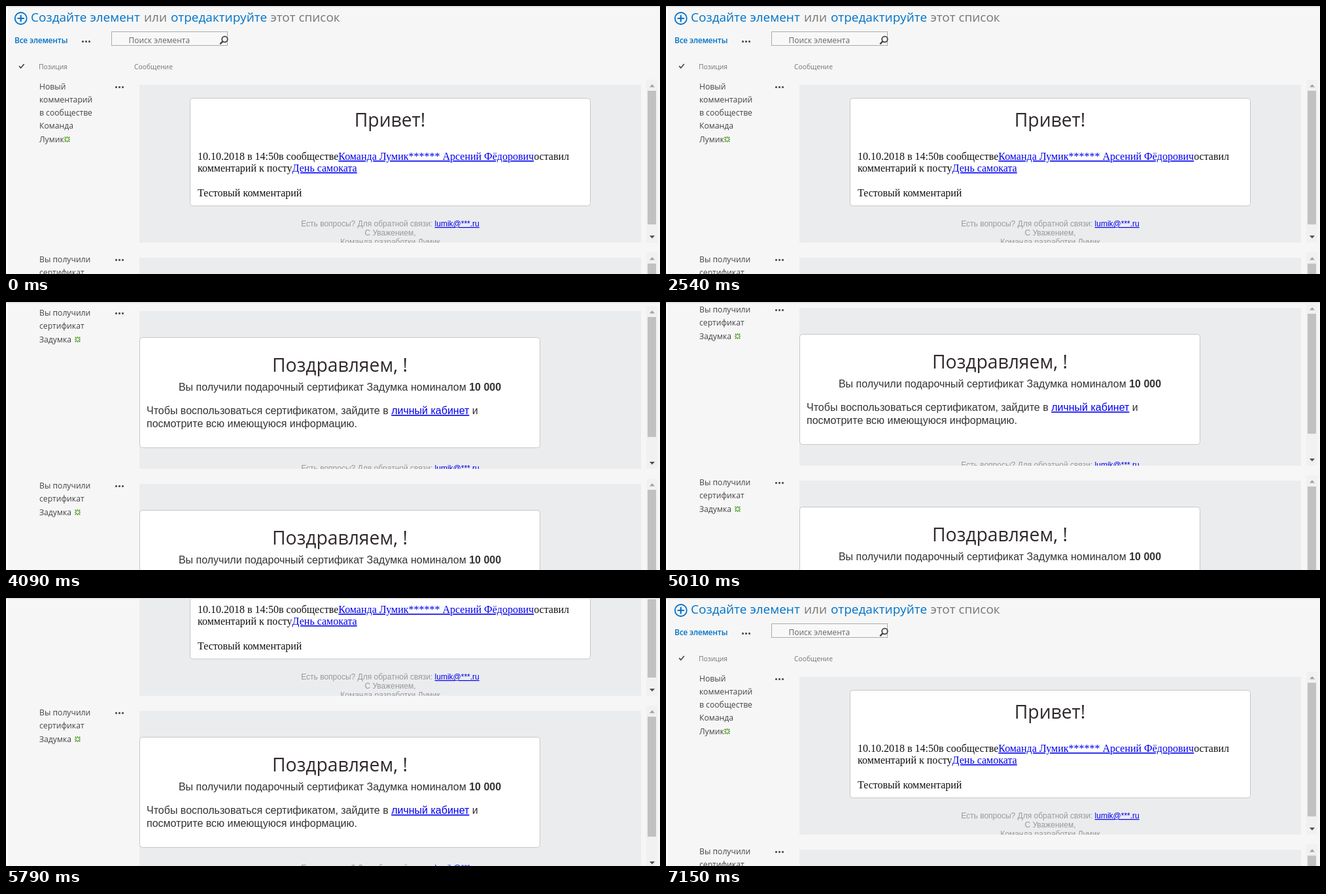
Write an HTML page that moves like this. It is 1000 by 411 pixels and loops after 7300 ms.

```html
<!DOCTYPE html>
<html lang="ru">
<head>
<meta charset="utf-8">
<title>Список сообщений</title>
<style>
  html, body { margin: 0; width: 100%; height: 100%; overflow: hidden; background: #f6f6f6; }
  svg { display: block; width: 100vw; height: 100vh; }
  .ui { font-family: "Open Sans", "Noto Sans", sans-serif; }
  .sans { font-family: "Liberation Sans", Arial, sans-serif; }
  .serif { font-family: "Liberation Serif", "Times New Roman", serif; }
  .link { fill: #0000ee; text-decoration: underline; }
  .mid { text-anchor: middle; }
</style>
</head>
<body>
<svg id="stage" viewBox="0 0 1000 411" preserveAspectRatio="none"></svg>
<script>
const LOOP = 7300;
const ROW_H = 265;
const BLUE = '#0072c6';

// Each track holds its value until the next time: [ms, value, ...]
const pageTrack = [
  [0, 0], [3310, 28], [3480, 100], [3640, 179], [3790, 238], [3940, 300], [4090, 372], [4240, 400],
  [5010, 377], [5170, 340], [5320, 305], [5470, 275], [5630, 243], [5790, 213], [5910, 70], [6060, 0]
];
const innerTrack = [[0, 0], [1190, 4], [1340, 9], [1490, 14], [1790, 5], [1940, 0]];
const thumbTrack = [[0, '#c1c1c1'], [740, '#a8a8a8'], [1040, '#787878'], [2240, '#a8a8a8'], [2540, '#c1c1c1']];
const cursorTrack = [
  [0], [290, 962, 396], [440, 974, 350], [590, 982, 312], [740, 984, 289],
  [1190, 984, 292], [1340, 984, 296], [1490, 984, 300], [1790, 986, 293], [1940, 987, 289],
  [2540], [6670, 984, 322], [6820, 976, 356], [7000, 962, 392], [7150]
];

const at = (track, t) => track.findLast(k => k[0] <= t);

const rect = (x, y, w, h, fill, more = '') =>
  `<rect x="${x}" y="${y}" width="${w}" height="${h}" fill="${fill}" ${more}/>`;
const text = (x, y, size, fill, str, cls = 'ui', more = '') =>
  `<text x="${x}" y="${y}" font-size="${size}" fill="${fill}" class="${cls}" ${more}>${str}</text>`;
const link = str => `<tspan class="link">${str}</tspan>`;
const dots = (x, y) => [0, 5, 10].map(d => rect(x + d, y, 3, 3, '#555', 'rx="1"')).join('');
const check = (x, y) =>
  `<path d="M${x} ${y}l2.7 3 5-6" fill="none" stroke="#444" stroke-width="1.7"/>`;
const card = (x, y, h) =>
  rect(x + .5, y + .5, 612, h, '#fff', 'rx="4" stroke="#c6c7c9"');

function sparkle(x, y) {
  let d = '';
  for (let i = 0; i < 8; i++) {
    const a = i * Math.PI / 4, r = i % 2 ? 5.4 : 4.4;
    const c = Math.cos(a), s = Math.sin(a);
    d += `M${x + c * 2} ${y + s * 2}L${x + c * r} ${y + s * r}`;
  }
  return `<path d="${d}" stroke="#4a9a1c" stroke-width="1.5"/>`;
}

function footer(y) {
  const line = (i, str) => text(587.5, y + i * 14, 12, '#999', str, 'sans mid');
  return line(0, `Есть вопросы? Для обратной связи: ${link('lumik@***.ru')}`) +
    line(1, 'С Уважением,') + line(2, 'Команда разработки Лумик');
}

function commentMail() {
  const line = (y, str) => text(293, y, 16, '#111', str, 'serif');
  return card(281, 141, 165) +
    text(587, 185, 28.3, '#30292b', 'Привет!', 'ui mid') +
    line(236, `10.10.2018 в 14:50в сообществе${link('Команда Лумик****** Арсений Фёдорович')}оставил`) +
    line(254, `комментарий к посту${link('День самоката')}`) +
    line(292, 'Тестовый комментарий') +
    footer(338);
}

function giftMail() {
  const line = (y, str, x = 215, cls = 'sans') => text(x, y, 16, '#333', str, cls);
  return card(204, 161, 169) +
    text(510.5, 214, 28.3, '#30292b', 'Поздравляем, !', 'ui mid') +
    line(243, 'Вы получили подарочный сертификат Задумка номиналом <tspan font-weight="700">10 000</tspan>', 510.5, 'sans mid') +
    line(279, `Чтобы воспользоваться сертификатом, зайдите в ${link('личный кабинет')} и`) +
    line(299, 'посмотрите всю имеющуюся информацию.') +
    footer(366);
}

const commentRow = {
  title: ['Новый', 'комментарий', 'в сообществе', 'Команда', 'Лумик'],
  star: 93.5, mail: commentMail, panel: 248, thumb: 205
};
const giftRow = {
  title: ['Вы получили', 'сертификат', 'Задумка'],
  star: 109.5, mail: giftMail, panel: 277, thumb: 184
};

function row(r, i) {
  const last = r.title.length - 1;
  const title = r.title.map((s, n) =>
    text(51, 128 + n * 20 + (n === last ? 1 : 0), 12.2, '#444', s)).join('');
  return `<g transform="translate(0 ${i * ROW_H})">
    <g id="hover${i}" visibility="hidden">
      ${rect(13, 108, 987, 265, '#e0eef9')}${rect(157, 108, 34, 265, '#cce4f7')}${check(20.5, 240)}
    </g>
    ${title}${sparkle(r.star, 124.5 + last * 20)}${dots(167, 123)}
    <g clip-path="url(#view)"><g id="mail${i}">${rect(204, 121, 767, r.panel, '#ebecee')}${r.mail()}</g></g>
    ${rect(979, 113, 17, 250, '#f1f1f1')}
    <path id="up${i}" d="M984 124.5h8l-4-4.5z" fill="#a3a3a3"/>
    <path id="down${i}" d="M984 352h8l-4 4.5z" fill="#505050"/>
    ${rect(981, 130, 13, r.thumb, '#c1c1c1', `id="thumb${i}"`)}
  </g>`;
}

function header() {
  const head = (x, fill, str) => text(x, 24, 19, fill, str);
  return `<g fill="none" stroke="${BLUE}" stroke-width="1.8">
      <circle cx="22.7" cy="19" r="9"/><path d="M17.5 19h10.4M22.7 13.8v10.4" stroke-width="2.2"/>
    </g>` +
    head(38, BLUE, 'Создайте элемент') + head(211, '#777', 'или') +
    head(252, BLUE, 'отредактируйте') + head(404.5, '#777', 'этот список') +
    text(13, 57, 12, BLUE, 'Все элементы', 'ui', 'font-weight="600" letter-spacing="-.25"') +
    dots(116, 53) +
    rect(161.5, 39.5, 177, 21, '#f8f8f8', 'stroke="#ababab"') +
    text(187.5, 57, 12, '#666', 'Поиск элемента') +
    `<g fill="none" stroke="#444"><circle cx="334.5" cy="51" r="4.3" stroke-width="1.8"/>
      <path d="M331.3 54.3l-4 4" stroke-width="2.4"/></g>` +
    check(20, 92) +
    text(50, 97, 10.3, '#777', 'Позиция') + text(196, 97, 10.3, '#777', 'Сообщение');
}

document.getElementById('stage').innerHTML = `
  <defs><clipPath id="view"><rect x="196" y="113" width="783" height="250"/></clipPath></defs>
  ${rect(0, 0, 1000, 411, '#f6f6f6')}
  <g id="page">${header()}${[commentRow, giftRow, giftRow].map(row).join('')}</g>
  ${rect(0, 0, 3, 411, '#fff')}
  ${rect(0, 0, 1000, 1, '#dcdce0')}${rect(0, 1, 1000, 1, '#ebebee')}
  <path id="cursor" d="M0 0V16.5L3.8 13 6.3 19 9 17.8 6.5 12H11.5Z"
    fill="#fff" stroke="#000" stroke-linejoin="round"/>`;

const el = id => document.getElementById(id);
const set = (id, name, value) => el(id).setAttribute(name, value);
const show = (id, on) => set(id, 'visibility', on ? 'visible' : 'hidden');

function draw(t) {
  const inner = at(innerTrack, t)[1];
  const [, x, y] = at(cursorTrack, t);
  const seen = x !== undefined;

  set('page', 'transform', `translate(0 ${-at(pageTrack, t)[1]})`);
  set('mail0', 'transform', `translate(0 ${-inner})`);
  set('thumb0', 'y', 130 + Math.round(inner * 11 / 14));
  set('thumb0', 'fill', at(thumbTrack, t)[1]);
  set('up0', 'fill', inner > 0 ? '#505050' : '#a3a3a3');
  set('down0', 'fill', inner < 14 ? '#505050' : '#a3a3a3');

  show('hover0', seen && y < 373);
  show('hover1', seen && y >= 373);
  show('cursor', seen);
  if (seen) set('cursor', 'transform', `translate(${x + .5} ${y + .5})`);
}

const start = performance.now();
function tick() {
  draw((performance.now() - start) % LOOP);
  requestAnimationFrame(tick);
}
tick();
</script>
</body>
</html>
```
